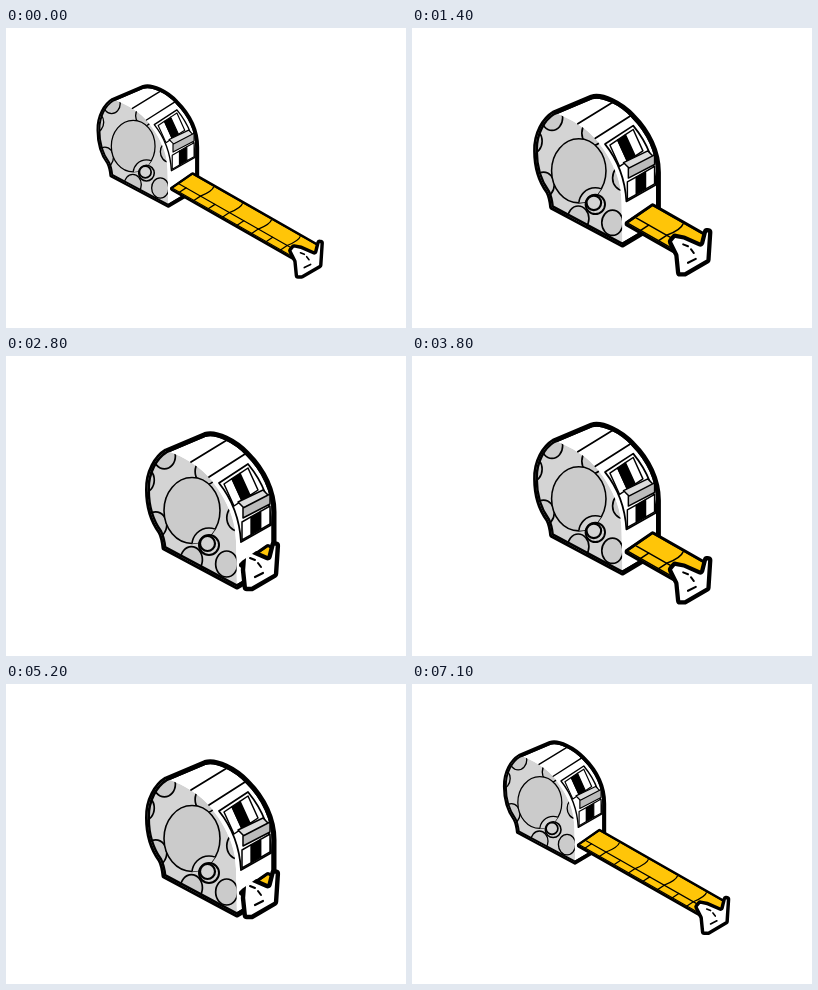
An HTML page with a canvas that plays this animation: 400 px wide and 300 px high, repeating every 7210 ms.

```html
<!DOCTYPE html>
<html>
<head>
<meta charset="utf-8">
<title>Tape measure</title>
<style>
html, body { margin: 0; width: 100%; height: 100%; overflow: hidden; background: #fff; }
canvas { display: block; width: 400px; height: 300px; }
</style>
</head>
<body>
<canvas id="stage" width="400" height="300"></canvas>
<script>
const ctx = document.getElementById('stage').getContext('2d');
const LOOP = 7210, STEP = 100, LAST_STEP = 71, CYCLE = 24;
const REACH = 122, SLOPE = 0.57;
const BLACK = '#000', WHITE = '#fff', YELLOW = '#ffc508', GREY = '#d4d4d4', DARK = '#cbcbcb';

const BACK = 'M231 231 L158 192 Q157 182 154 176 C146 165 141.5 149 141.5 134 C141 116 150 101 160 95';
const BODY = new Path2D(BACK + 'L199 78.5 C210 75 230 85 242 98 C258 114 268 135 268 156 L268 209 Z');
const SIDE = new Path2D(BACK + 'Q172 98 186 107 C206 120 229 150 230 185 Z');
const PANEL = new Path2D('M213 127 L242 108 Q265 136 265 169 L235 186 Q233 152 213 127 Z');

const smooth = u => u * u * (3 - 2 * u);
const mix = (a, b, t) => a + (b - a) * t;

function paint(path, fill, line, width) {
  if (fill) { ctx.fillStyle = fill; ctx.fill(path); }
  if (line) { ctx.strokeStyle = line; ctx.lineWidth = width; ctx.stroke(path); }
}

function line(x, y, dx, dy, width) {
  const path = new Path2D();
  path.moveTo(x, y);
  path.lineTo(x + dx, y + dy);
  paint(path, null, BLACK, width);
}

function poly(points, radius = 0) {
  const path = new Path2D();
  const next = i => points[(i + 1) % points.length];
  const last = points[points.length - 1];
  path.moveTo((last[0] + points[0][0]) / 2, (last[1] + points[0][1]) / 2);
  points.forEach((p, i) => path.arcTo(...p, ...next(i), radius));
  path.closePath();
  return path;
}

function disc(x, y, rx, ry, fill, width) {
  const path = new Path2D();
  path.ellipse(x, y, rx, ry, 0, 0, Math.PI * 2);
  paint(path, fill, BLACK, width);
  return path;
}

// Slanted box on the front face
function slab(x, y, w, rise, h, lean, fill, width = 1.5) {
  paint(poly([[x, y], [x + w, y - rise], [x + w + lean, y - rise + h], [x + lean, y + h]]),
    fill, BLACK, width);
}

function checks(x, y, w, rise, h, lean) {
  for (let i = 0; i < 3; i++) {
    slab(x + w * i / 3, y - rise * i / 3, w / 3, rise / 3, h, lean, i === 1 ? BLACK : WHITE);
  }
}

function drawSide() {
  ctx.save();
  ctx.clip(SIDE);
  paint(SIDE, GREY);
  for (let i = 0; i < 7; i++) {
    const a = (45 + 45 * i + 0.67 * i * i) * Math.PI / 180;
    const dx = 49 * Math.cos(a);
    disc(186 + dx, 155 + 49 * Math.sin(a) + 0.53 * dx, 11, 13, DARK, 1.7);
  }
  const dial = disc(186, 154.5, 28, 33, DARK, 1.6);
  ctx.clip(dial);
  disc(203, 189, 17, 17, GREY, 1.6);
  ctx.restore();
}

function drawBody() {
  paint(BODY, WHITE, BLACK, 5);
  ctx.save();
  ctx.clip(BODY);
  drawSide();
  line(185, 106, 36, -22, 1.8);
  line(203, 121, 36, -23, 1.8);
  paint(BODY, null, BLACK, 5);
  ctx.restore();

  disc(203, 189, 10, 10, GREY, 2);
  disc(201.5, 187.5, 7.5, 7.5, GREY, 2.2);

  paint(PANEL, WHITE, BLACK, 1.8);
  checks(218, 128, 24, 16, 22, 10);
  checks(236, 166, 28, 16, 18, 0);
  slab(232, 146, 25, 12, 6, 6, '#dcdcdc');
  slab(237, 152, 27, 14, 10, 0, '#bcbcbc');
  line(236, 209, 26, -18, 3);
}

function drawTape(out) {
  const end = out + 8, drop = end * SLOPE;
  const strip = poly([[236, 209], [262, 191], [262 + end, 191 + drop], [236 + end, 209 + drop]]);
  paint(strip, YELLOW, BLACK, 6);
  ctx.save();
  ctx.clip(strip);
  paint(strip, YELLOW);
  line(245, 203, end, drop, 1.5);
  for (let d = out - 18, i = 0; d > -20; d -= 18.5, i++) {
    const x = 236 + d, y = 209 + d * SLOPE, mark = new Path2D();
    mark.moveTo(x, y);
    mark.lineTo(x + 9, y - 6);
    if (i % 2 === 0) mark.quadraticCurveTo(x + 24, y - 12, x + 26, y - 18);
    paint(mark, null, BLACK, 1.6);
  }
  line(236, 209, end, drop, 3);
  ctx.restore();
}

function drawHook(out) {
  const free = Math.min(1, out / 14);
  const knob = (x0, y0, x1, y1) => [mix(x0, x1, free), mix(y0, y1, free)];
  ctx.save();
  ctx.translate(241 + out, 232 + out * SLOPE);
  const plate = poly([knob(-3, -32, -11, -33), knob(-2, -37, -6, -39), [4, -37], [22, -29],
    [26, -45], [31, -44], [29, -13], [5, 1], [-2, 1], knob(-4, -18, -4, -19)], 2);
  paint(plate, WHITE, BLACK, 4.4);
  line(8, -11, 8, -4, 2.2);
  line(3, -30, 5, 2, 2);
  line(11, -25, 3, 4, 2);
  ctx.restore();
}

// Snaps shut, rests, then slides out again
function extension(phase) {
  if (phase < 4) return REACH * (1 - smooth(phase / 4));
  return REACH * smooth(Math.max(0, phase - 8) / 16);
}

function render() {
  const step = Math.min(LAST_STEP, Math.floor(performance.now() % LOOP / STEP));
  const ext = extension(step % CYCLE);
  const out = ext * 1.28;
  const left = 141 - 0.494 * ext + 0.00076 * ext * ext;
  const top = 77.5 - 0.2865 * ext + 0.00104 * ext * ext;
  const zoom = 1 - (0.00031 * ext + 0.0000163 * ext * ext) / 1.28;

  ctx.fillStyle = WHITE;
  ctx.fillRect(0, 0, 400, 300);
  ctx.save();
  ctx.lineJoin = ctx.lineCap = 'round';
  ctx.translate(left, top);
  ctx.scale(zoom, zoom);
  ctx.translate(-141, -77.5);
  drawBody();
  // The tape shows only in front of its slot
  ctx.clip(poly([[233, 400], [233, 207], [300, 160], [600, 160], [600, 400]]));
  drawTape(out);
  drawHook(out);
  ctx.restore();
  requestAnimationFrame(render);
}
render();
</script>
</body>
</html>
```
